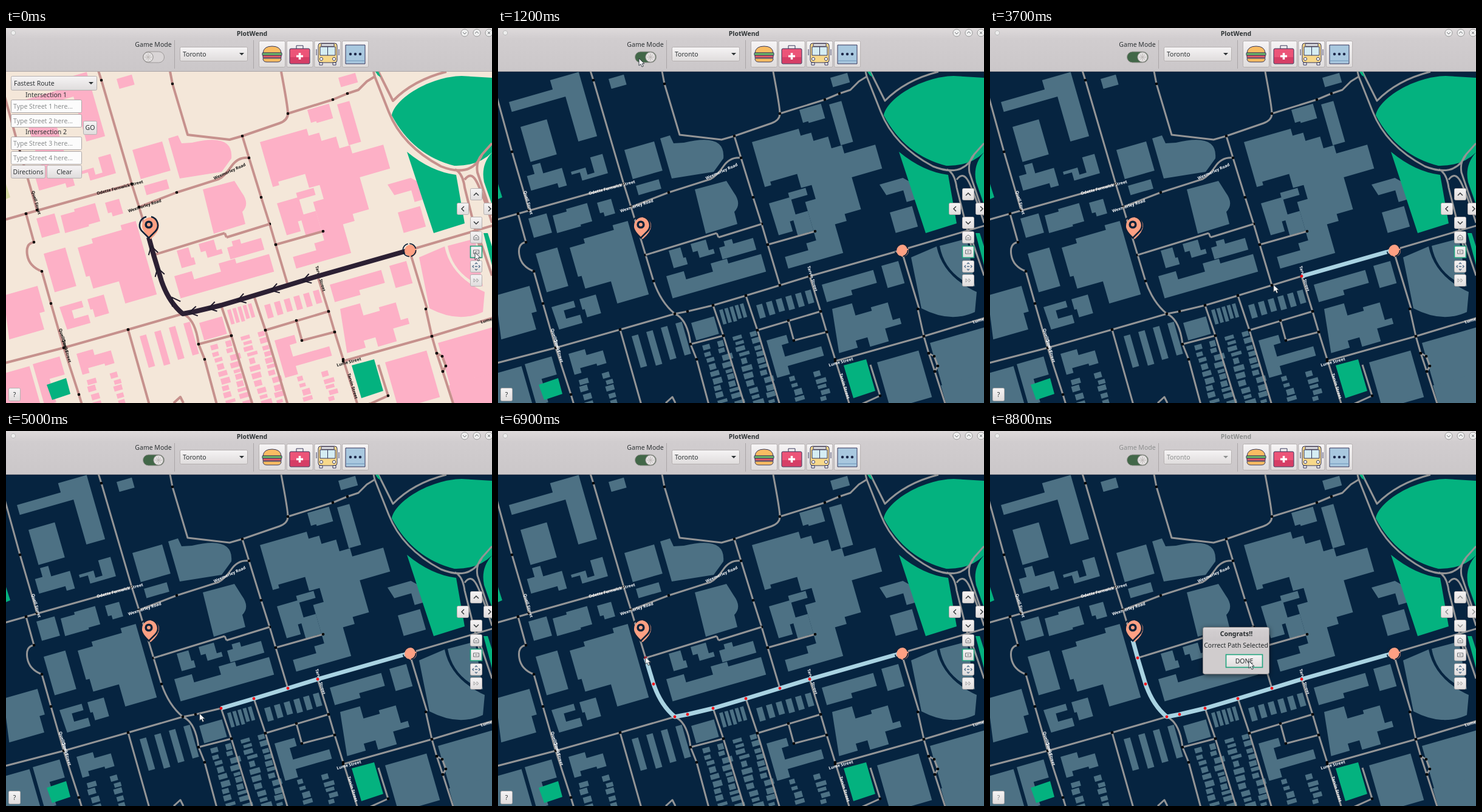
An HTML page for the animation above (8900 ms loop, 800 by 618 pixels).

```html
<!DOCTYPE html>
<html lang="en">
<head>
<meta charset="utf-8">
<style>
html, body { margin: 0; width: 100%; height: 100%; overflow: hidden; }
svg { display: block; width: 800px; height: 618px; font: 10.5px 'Noto Sans', 'Open Sans', sans-serif;
  --land: #f4e7d9; --block: #fdb0c6; --road: #c6918d; --label: #111; --roadw: 4; --ink: #2d3234; }
svg.dark { --land: #062440; --block: #4d7184; --road: #949596; --label: #fff; --roadw: 3; }
svg.asleep { --ink: #8d8f8f; }
.blocks { fill: var(--block); }
.roads { fill: none; stroke: var(--road); stroke-width: var(--roadw); stroke-linejoin: round; }
.junctions { marker: url(#dot); }
.green { fill: #04b27f; }
.labels { font-weight: 700; font-size: 6.8px; fill: var(--label); }
.ui text { fill: var(--ink); }
.ui .hint { fill: #8b8e8f; }
.mid { text-anchor: middle; }
.bold { font-weight: 700; }
.btn { fill: url(#face); stroke: #b5b0b0; }
.line { fill: none; stroke: var(--ink); stroke-width: 1.4; }
.thin { fill: none; stroke: #6c7174; }
.lit { fill: none; stroke: #20a47d; stroke-width: 1.6; }
.dark .light-only, .asleep .lit.focus, svg:not(.dark) .dark-only { display: none; }
.icon { stroke: #34355a; stroke-linejoin: round; }
</style>
</head>
<body>
<svg id="stage" viewBox="0 0 800 618">
  <defs>
    <linearGradient id="face" x2="0" y2="1"><stop stop-color="#f6f4f5"/><stop offset="1" stop-color="#dfdcdc"/></linearGradient>
    <linearGradient id="bar" x2="0" y2="1"><stop stop-color="#dedadb"/><stop offset=".25" stop-color="#d1cdcf"/><stop offset="1" stop-color="#cbc7c9"/></linearGradient>
    <filter id="shadow" x="-20%" y="-20%" width="140%" height="150%"><feDropShadow dx="0" dy="2" stdDeviation="4" flood-opacity=".55"/></filter>
    <marker id="dot" viewBox="-3 -3 6 6" markerWidth="6" markerHeight="6" markerUnits="userSpaceOnUse"><circle r="2.3" fill="#050505"/></marker>
  </defs>
  <rect width="800" height="618" fill="var(--land)"/>

  <g class="blocks">
    <g id="blocks"></g>
    <path d="M267 182 283 177 289 190 306 189Q375 172 371 215L355 237 286 248ZM324 266 376 252 388 271Q402 290 389 303L394 323 342 339Z"/>
    <path d="M680 378 722 360Q732 409 788 435L785 468Q745 487 697 462ZM727 359 772 347 785 426Q736 407 727 359Z"/>
  </g>

  <g class="green">
    <path d="M635 144C640 116 698 80 750 79L800 82V205Q777 228 738 227 670 210 635 144ZM660 204Q700 237 741 242L755 322 704 338ZM800 205Q781 226 787 254L800 291ZM786 338H793L800 360V391ZM67 588 99 577 106 603 76 613ZM569 556 606 546 621 598 585 610Z"/>
    <path class="dark-only" d="M0 257 7 279 0 282Z"/>
    <path class="light-only" fill="#d8dba6" d="M0 257 7 279 0 282Z"/>
  </g>

  <g class="roads">
    <path d="M46 353Q32 355 35 374T59 401M256 417Q268 452 291 471 312 480 317 521M281 271 350 249Q360 244 371 228T400 214M274 92 299 176 368 184 389 178 450 157Q464 152 464 141T453 72M562 108 580 102 594 88 607 80M360 338 363 345M664 366 693 462M613 555 629 606M276 618 287 608 292 618"/>
    <path d="M605 72 607 80 630 138Q652 194 716 228 766 248 784 208L800 190M613 72 637 120Q670 86 725 72M739 233Q752 239 755 263L782 371M755 250Q765 236 774 252T800 321M784 208Q773 220 776 238L800 309M780 349 800 408"/>
    <path class="junctions" d="M-9 88 23 204 51 300M33 306 46 353M59 401 74 454 95 527 120 604 126 624M149 61 157 86 207 257 219 295 243 374 256 417M317 521 327 546 349 628M-9 318 33 306 207 257M219 295 281 271M268 61 274 92M464 141 538 118 562 108M389 178 400 214 420 279 434 323 444 357 464 424M444 357 522 335"/>
    <path class="junctions" d="M-9 554 95 527 201 497 291 471 312 467 354 457 408 441 464 424 513 409 664 366 810 323M201 497 238 628M354 457 371 507 408 628M317 521 371 507M408 441 427 498 466 628M427 498 531 467M478 482 487 515 541 501M513 409 531 467 541 501 555 546 581 628M555 549 701 508 810 475M691 463 701 508 709 536 719 566 739 628M709 536 718 541 724 557 719 566M629 606 598 620"/>
    <path d="M243 374 360 338M363 345 434 323"/>
  </g>
  <path class="green" d="M608 72H613L617 81 612 78Z"/>
  <g class="labels" id="labels"></g>
  <g id="route" fill="none"></g>

  <path fill="#fea083" d="M238 348Q223 333 224 326A14 14 0 0 1 252 326Q252 336 238 348Z"/>
  <circle cx="666" cy="367" r="10" fill="#fea083"/>
  <g fill="none" stroke="#0c2239" stroke-width="2.6">
    <path d="M239 311A14.500 14.500 0 0 1 246 335L235 346 223 334A14.500 14.500 0 0 1 231 311"/>
    <circle cx="235" cy="324" r="4.800" stroke-width="3.6"/>
    <circle cx="664" cy="366" r="10.700" stroke-width="1.8" stroke-dasharray="14 2.800"/>
  </g>

  <g class="ui">
    <rect width="800" height="71.500" fill="url(#bar)"/>
    <path stroke="#aaa5a7" d="M0 71.500H800M277.500 20V67M407.500 20V67"/>
    <text class="mid bold" x="405" y="13">PlotWend</text>
    <circle cx="12" cy="8" r="3.700" fill="#eee" stroke="#bbb"/>
    <g fill="#eee" stroke="#999"><circle cx="755" cy="8" r="6"/><circle cx="775" cy="8" r="6"/><circle cx="795" cy="8" r="6"/></g>
    <path class="thin" d="M752 7 755 10 758 7M772 9 775 6 778 9M793 6 797 10M797 6 793 10"/>
    <text class="mid" x="242.500" y="31">Game Mode</text>
    <rect id="track" x="225.500" y="39" width="35" height="18" rx="9" stroke="#9c9898"/>
    <g id="knob"><circle r="8.200" fill="#e4e1e1" stroke="#8f8c8a"/><path stroke="#bcb7b5" d="M-4-4 4 4M-4 4 4-4M0-6V6M-6 0H6"/></g>
    <g id="tools"></g>
    <g class="icon" fill="#f9bc62">
      <path d="M423 41Q424 30 438 30T453 41Z"/><path fill="#73c66a" d="M422 41H454V45H422Z"/><path fill="#e35b66" d="M423 45H453V49H423Z"/><path d="M423 50H453Q453 56 447 56H429Q423 56 423 50Z"/>
      <path fill="none" d="M478 34V29H489V34"/><rect x="467" y="34" width="33" height="25" rx="2" fill="#ec5478"/><path stroke="none" fill="#d63e66" d="M468 48H499V58H468Z"/><path fill="none" stroke="#fff" stroke-width="3.500" d="M483.500 41V52M478 46.500H489"/>
      <rect x="514" y="25" width="31" height="32" rx="4" fill="#f7d88a"/><rect x="517" y="31" width="25" height="14" fill="#d5edf3"/><path fill="#eee" d="M519 26H540V30H519ZM516 57H521V61H516ZM538 57H543V61H538Z"/><path d="M529.500 31V45M511 35V45M548 35V45"/><circle cx="519" cy="51" r="2.500" fill="#fff"/><circle cx="540" cy="51" r="2.500" fill="#fff"/>
      <rect x="559" y="28" width="32" height="31" fill="#a9c8df"/><path d="M559 54H591" stroke="#6b93b7"/><path fill="none" stroke="#202b4b" stroke-width="4.500" stroke-linecap="round" stroke-dasharray="0 8" d="M567 43H584"/>
    </g>
    <g id="panel" class="light-only"></g>
    <g id="nav"></g>
    <path class="line" d="M770 276 774 272 778 276M754 294 750 298 754 302M794 294 798 298 794 302M770 319 774 323 778 319"/>
    <path class="thin" d="M770 349V344L774 341 778 344V349ZM772 346H776M769.500 366H778.500V372H769.500ZM772 369H776"/>
    <path fill="none" stroke="#526f8b" stroke-width="1.400" d="M772 389 774 387 776 389M778 391 780 393 778 395M776 397 774 399 772 397M770 395 768 393 770 391M772 393H776"/>
    <path fill="none" stroke="#a6a6a6" d="M770 413 773 416 770 419ZM775 413 778 416 775 419Z"/>
    <rect class="lit focus" x="764.500" y="359.500" width="19" height="19"/>
  </g>

  <g id="dialog">
    <rect x="350.500" y="323.500" width="109" height="77" rx="3" fill="#d0cccd" stroke="#898687" filter="url(#shadow)"/>
    <path d="M351 327Q351 324 354 324H456Q459 324 459 327V345H351Z" fill="url(#bar)"/>
    <g class="mid" fill="#252a2c"><text class="bold" x="405.500" y="338">Congrats!!</text><text x="405" y="357">Correct Path Selected</text>
    <rect class="btn" x="388.500" y="368.500" width="60" height="21"/><rect class="lit" x="388.500" y="368.500" width="60" height="21"/><text x="418.500" y="383">DONE</text></g>
  </g>
  <path id="cursor" d="M0 0V12L3 9.500 5 14 7.300 13 5.300 8.700H9Z" fill="#f5f5f5" stroke="#29333c" stroke-width=".9"/>
</svg>
<script>
const $ = id => document.getElementById(id);
const stage = $('stage');
const LOOP = 8900, DARK_AT = 1200, DONE_AT = 7500;
const TILT = 16; // the street grid leans by this angle

// Buildings: a corner on the map, then an outline along the street grid
const block = (x, y, outline) => `<path transform="translate(${x} ${y}) rotate(${-TILT})" d="M0 0${outline}z"/>`;
const rectBlock = (x, y, w, h) => block(x, y, `h${w}v${h}h${-w}`);
const north = block(18, 122, 'h75v-16h49v110h-32v-77h-92') + rectBlock(37, 163, 45, 60) + block(56, 226, 'h14v18h32v30h-14v-8h-45v-25h13') +
  block(120, 237, 'h25v12h12v-26h21v33h-44v-14h-14') + rectBlock(182, 84, 26, 17) + rectBlock(208, 201, 51, 50) + rectBlock(227, 260, 39, 16) +
  block(496, 135, 'h37v25h-28v-3h-9') + rectBlock(545, 126, 21, 70) + rectBlock(547, 82, 29, 16) +
  block(628, 258, 'h40l12 12v28h-17v-20h-29') + rectBlock(645, 304, 38, 35);
const west = rectBlock(50, 314, 31, 33) + block(90, 309, 'h24v-4h36v31h-20v3h-41') + block(163, 288, 'h24v25h-18v-7h-6') +
  block(118, 362, 'h26v-8h52v-8h26v126h-54v-38h-44v-22h-6') + rectBlock(62, 372, 37, 66) + block(88, 460, 'h38v11h-20v14h24v14h-40') +
  block(134, 447, 'h28v32h-24v-14h-4') + block(-4, 441, 'h58v44h-9v28h-60') + rectBlock(-20, 574, 61, 70) + block(44, 554, 'h46v31h-26v40h-20') +
  block(116, 537, 'h28v10h28v22h-16v-4h-28v8h-12');
const center = rectBlock(318, 486, 39, 30) + block(281, 367, 'h20v18h4v12h-24') + block(317, 356, 'h26v18h8v8h-26v-12h-8') +
  block(364, 362, 'h10v-8h14v8h34v20h-58') + block(277, 409, 'h30v14h46v-14h28v8h56v30h-160') +
  block(418, 188, 'h80v12h18v14h25v20h18v14h53v41h-52v55h-28v12h-20v49h-94v-20h40v-12h17v-66h18v-24h-18v-24h-46v6h-11') +
  block(446, 289, 'h35v-8h30v12h-28v34h-12v17h-24') + rectBlock(484, 309, 27, 34);
const south = block(533, 423, 'h88v22h-44v8h-44') + rectBlock(631, 392, 29, 38) + block(442, 515, 'h34v14h-12v20h62v16h-62v14h-22') +
  block(550, 463, 'h34v21h28v-6h29v30h12v10h-28v22h-32v-16h-20v12h-32') + rectBlock(624, 551, 71, 80) +
  rectBlock(711, 519, 110, 76) + rectBlock(729, 589, 90, 50);

let seed = 7;
const random = () => (seed = seed * 16807 % 2147483647) / 2147483647;
// Back yards: irregular houses down a side street, starting below the main road
function houseColumn(x, offset = 0) {
  let houses = '';
  for (let y = 617 - 0.28 * x + offset; y < 618;) {
    const w = 9 + random() * 9, h = 5 + random() * 5, step = h + 2 + random() * 2;
    houses += rectBlock(x + random() * 4, y, w, h);
    y += step;
    x += step * 0.29;
  }
  return houses;
}
// Evenly spaced buildings along the grid
const terrace = (x, y, count, pitch, w, h) => Array.from({ length: count }, (_, i) =>
  rectBlock(x + i * pitch, y - i * pitch * 0.29, w, h + random() * 4)).join('');
$('blocks').innerHTML = north + west + center + south +
  terrace(220, 508, 4, 24, 11, 54) + terrace(425, 457, 6, 16, 10, 20) + terrace(364, 465, 5, 8.5, 6, 22) +
  [130, 170, 334, 358, 385, 412].map(x => houseColumn(x)).join('') + houseColumn(478, 92) + houseColumn(518, 95);

$('labels').innerHTML = [
  ['Odette Fernwick Street', 150, 275, -14.5], ['Wexmorley Road', 202, 304, -18], ['Wexmorley Road', 343, 250, -24],
  ['Quell Street', 42, 269, 74], ['Quell Street', 87, 496, 74], ['Quell Street', 92, 513, 74],
  ['Tarvin Street', 509, 393, 73], ['Tarvin Street', 562, 570, 73], ['Lume Street', 545, 558, -15], ['Lume Street', 782, 487, -15]
].map(([name, x, y, angle]) => `<text transform="translate(${x} ${y}) rotate(${angle})">${name}</text>`).join('');

// Widgets
const box = (x, y, w, h) => `<rect class="btn" x="${x + .5}" y="${y + .5}" width="${w}" height="${h}" rx="2"/>`;
const button = (x, y, w, h, label) => box(x, y, w, h) + `<text class="mid" x="${x + w / 2 + .5}" y="${y + h / 2 + 4}">${label}</text>`;
const combo = (x, y, w, h, label) => box(x, y, w, h) + `<text x="${x + 5}" y="${y + h / 2 + 4}">${label}</text>` +
  `<path fill="var(--ink)" d="M${x + w - 13} ${y + h / 2 - 1.5}h8l-4 4z"/>`;
const entry = (y, n) => `<rect x="8.5" y="${y}" width="116" height="21" rx="2" fill="#fcfcfc" stroke="#aaa5a5"/>` +
  `<text class="hint" x="12" y="${y + 14.5}">Type Street ${n} here...</text>`;
const intersection = (y, n) => `<text class="mid" x="66" y="${y}">Intersection ${n}</text>` +
  entry(y + 4.5, 2 * n - 1) + entry(y + 28.5, 2 * n);

$('tools').innerHTML = combo(286, 31, 111, 23, 'Toronto') + [0, 1, 2, 3].map(i => box(416 + i * 45.7, 21, 43, 43)).join('');
$('panel').innerHTML = combo(8, 79, 141, 23, 'Fastest Route') + intersection(114, 1) + intersection(175, 2) +
  button(127, 153, 22, 22, 'GO') + button(8, 226, 56, 21, 'Directions') + button(67, 226, 57, 21, 'Clear');
$('nav').innerHTML = [0, 2, 3, 4, 5, 6].map(i => box(764, Math.round(264 + i * 23.7), 19, 19)).join('') +
  box(742, 288, 19, 19) + box(786, 288, 19, 19) + button(4, 593, 19, 21, '?');

// Each leg: time it is picked, end point, and optional bend
const legs = [[3100, 513, 409], [3800, 464, 424], [4300, 408, 441], [4700, 354, 457], [5100, 312, 467], [5600, 291, 471],
  [6200, 256, 417, 'Q268 452'], [6800, 243, 374], [DONE_AT, 235, 345]];
const routePath = picked => 'M664 366' + picked.map(([, x, y, bend = 'L']) => `${bend} ${x} ${y}`).join('');

// An arrowhead halfway along every leg but the first
const arrow = ([, x, y], i) => {
  const [, x0, y0] = legs[i], angle = Math.atan2(y - y0, x - x0) * 180 / Math.PI;
  return `<path d="M-13-8 0 0-13 8" stroke="#211b2b" stroke-width="2" transform="translate(${(x + x0) / 2} ${(y + y0) / 2}) rotate(${angle})"/>`;
};
const plannedRoute = `<path d="${routePath(legs)}" stroke="#2c2033" stroke-width="8" stroke-linejoin="round"/>` +
  legs.slice(1).map(arrow).join('');
function pickedRoute(t) {
  const picked = legs.filter(leg => t >= leg[0]);
  if (!picked.length) return '';
  return `<path d="${routePath(picked)}" stroke="#a9d3e2" stroke-width="7" stroke-linejoin="round"/>` +
    picked.filter(leg => leg[0] < DONE_AT).map(([, x, y]) => `<circle cx="${x}" cy="${y}" r="2.4" fill="#f20d18"/>`).join('');
}

// The pointer goes from the zoom button to the switch, over each leg, then to the dialog
const pointerStops = [[0, 772, 370], [100, 772, 370], [900, 232, 50], [1500, 232, 50], ...legs, [7800, 235, 345], [8600, 426, 379], [LOOP, 426, 379]];
function pointerAt(t) {
  const i = pointerStops.findIndex(stop => stop[0] > t);
  const [t0, x0, y0] = pointerStops[i - 1], [t1, x1, y1] = pointerStops[i];
  const p = (t - t0) / (t1 - t0), k = p * p * (3 - 2 * p);
  return [x0 + (x1 - x0) * k, y0 + (y1 - y0) * k];
}

let lastTime = -1;
function draw(now) {
  requestAnimationFrame(draw);
  const t = Math.floor(now % LOOP / 100) * 100;
  if (t === lastTime) return;
  lastTime = t;
  const dark = t >= DARK_AT, done = t >= DONE_AT;
  stage.classList.toggle('dark', dark);
  stage.classList.toggle('asleep', done);
  $('track').setAttribute('fill', dark ? '#426748' : '#d9d5d6');
  $('knob').setAttribute('transform', `translate(${dark ? 251 : 234} 48)`);
  $('route').innerHTML = dark ? pickedRoute(t) : plannedRoute;
  $('dialog').style.display = done ? '' : 'none';
  $('cursor').setAttribute('transform', `translate(${pointerAt(t)})`);
}
draw(performance.now());
</script>
</body>
</html>
```
